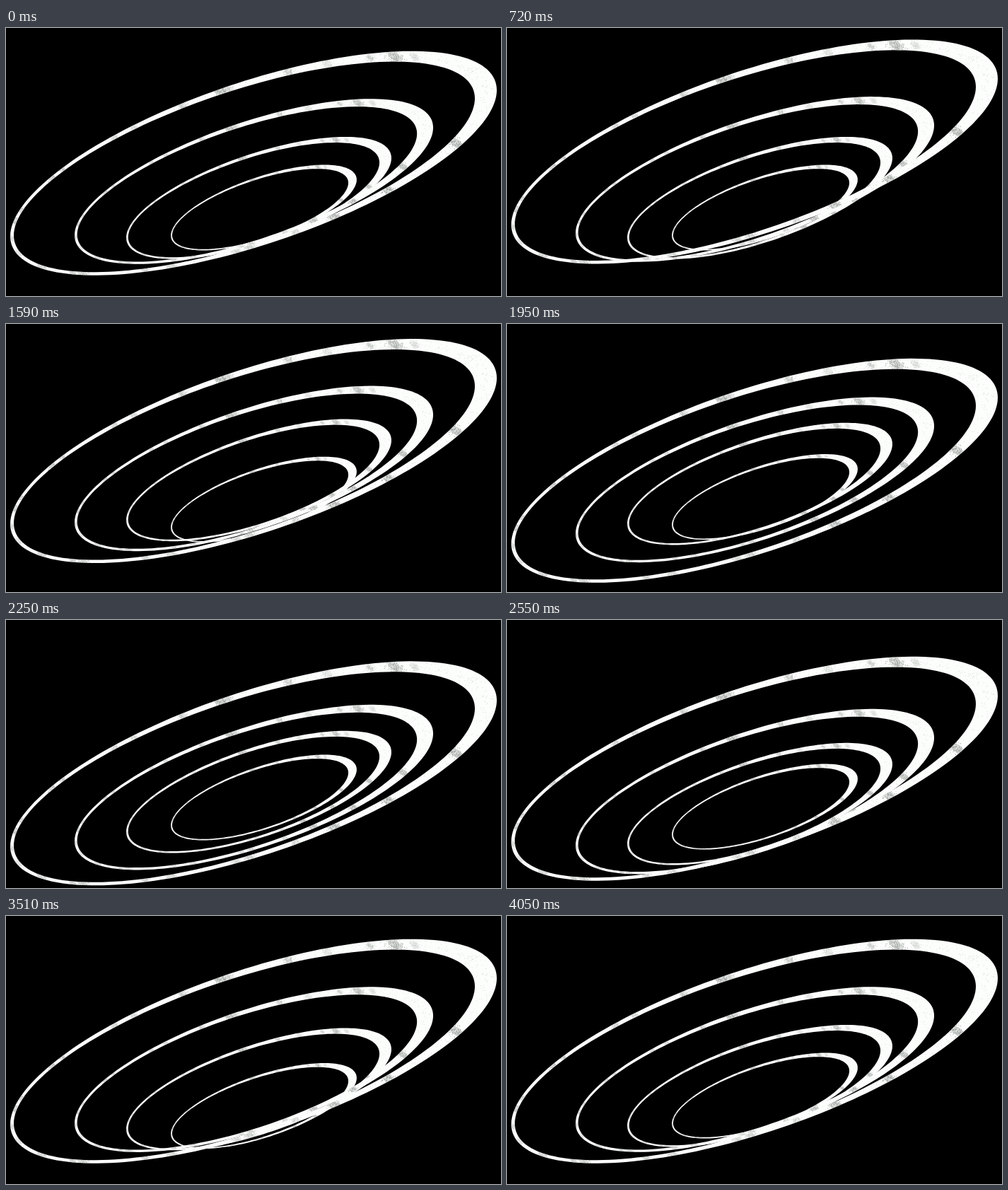
An HTML page for the animation above (4.08 s loop, 700 px wide and 379 px high).

```html
<!DOCTYPE html>
<html lang="en">
<head>
<meta charset="utf-8">
<title>Rings</title>
<style>
  html, body { margin: 0; width: 100%; height: 100%; overflow: hidden; background: #000; }
  svg { display: block; width: 100vw; height: 100vh; }
</style>
</head>
<body>
<svg id="stage" viewBox="0 0 700 379">
  <defs>
    <clipPath id="band"><path id="bandShape" clip-rule="evenodd"/></clipPath>
    <g id="ring">
      <path id="ringShape" fill="#fcfefc" fill-rule="evenodd"/>
      <g id="grain" clip-path="url(#band)"></g>
    </g>
  </defs>
</svg>
<script>
const NS = 'http://www.w3.org/2000/svg';
const LOOP = 4080, STEP = 30, DROP = 25.7;
const SKEW = 0.651, RISE = Math.sqrt(1 - SKEW * SKEW);
const OUTER = { x: 0, y: 0, w: 344, h: 158.5 };
const INNER = { x: -13, y: 5.2, w: 326, h: 148.8 };
const MIDDLE = { x: -6.5, y: 2.6, w: 335, h: 153.6 };

const byId = id => document.getElementById(id);

function add(parent, tag, attrs) {
  const node = document.createElementNS(NS, tag);
  for (const key in attrs) node.setAttribute(key, attrs[key]);
  return parent.appendChild(node);
}

// Point on a tilted ellipse; angles run clockwise from the right.
function pointAt({ x, y, w, h }, angle) {
  const c = Math.cos(angle), s = Math.sin(angle);
  return [x + w * c, y + h * (RISE * s - SKEW * c)];
}

function outline(ellipse) {
  const points = Array.from({ length: 180 }, (_, i) =>
    pointAt(ellipse, i * Math.PI / 90).map(v => v.toFixed(2)).join(' '));
  return 'M' + points.join('L') + 'Z';
}

const band = outline(OUTER) + outline(INNER);
byId('ringShape').setAttribute('d', band);
byId('bandShape').setAttribute('d', band);

let seed = 7;
const random = () => (seed = seed * 16807 % 2147483647) / 2147483647;
const spread = () => random() + random() + random() - 1.5;
const grain = byId('grain');
const dot = (x, y) => `M${x.toFixed(1)} ${y.toFixed(1)}h1`;

// A slanted worn streak with speckle.
function wear(angle, size, strength) {
  const [x, y] = pointAt(MIDDLE, angle);
  const mark = add(grain, 'g', {
    transform: `translate(${x} ${y}) rotate(35)`, opacity: strength
  });
  add(mark, 'ellipse', { rx: size * 0.85, ry: size * 0.4, fill: '#8b918b', opacity: 0.5 });
  let dots = '';
  for (let i = 0; i < size * 9; i++) dots += dot(spread() * size, spread() * size * 0.6);
  add(mark, 'path', { d: dots, stroke: '#5c625c' });
}

for (const degrees of [-97, -52, 29, 54, 69]) wear(degrees * Math.PI / 180, 14, 0.55);
for (let i = 0; i < 22; i++) {
  wear(-Math.PI * (0.25 + i / 16 + random() / 20), 6 + 6 * random(), 0.2 + 0.2 * random());
}

let dust = '';
for (let i = 0; i < 700; i++) {
  const [x, y] = pointAt(MIDDLE, random() * 2 * Math.PI);
  dust += dot(x + spread() * 20, y + spread() * 10);
}
add(grain, 'path', { d: dust, stroke: '#8b918b', opacity: 0.3 });

// Outermost first; lift is how far a ring rises before it sinks.
const rings = [
  { x: 350, y: 191.2, scale: 1, lift: 26 },
  { x: 350.5, y: 217, scale: 0.737, lift: 14 },
  { x: 357.5, y: 240.3, scale: 0.545, lift: 20 },
  { x: 364.5, y: 254, scale: 0.382, lift: 9.5 }
];
rings.forEach((ring, i) => {
  Object.assign(ring, {
    start: 385 * i, high: 1240 + 225 * i, low: 2230 + 290 * i, rest: 3290 + 262 * i
  });
});
for (const ring of [...rings].reverse()) ring.node = add(byId('stage'), 'use', { href: '#ring' });

const ease = p => (1 - Math.cos(Math.PI * p)) / 2;

function offset({ start, high, low, rest, lift }, t) {
  const part = (a, b) => (t - a) / (b - a);
  if (t <= start || t >= rest) return 0;
  if (t < high) return -lift * ease(part(start, high));
  if (t < low) return -lift + (DROP + lift) * ease(part(high, low));
  return DROP * (1 - ease(part(low, rest) ** 0.9));
}

function draw(t) {
  for (const ring of rings) {
    const y = ring.y + offset(ring, t);
    ring.node.setAttribute('transform', `translate(${ring.x} ${y.toFixed(2)}) scale(${ring.scale})`);
  }
}

const begin = performance.now();
function tick() {
  const t = (performance.now() - begin) % LOOP;
  draw(Math.floor(t / STEP) * STEP);
  requestAnimationFrame(tick);
}
draw(0);
requestAnimationFrame(tick);
</script>
</body>
</html>
```
